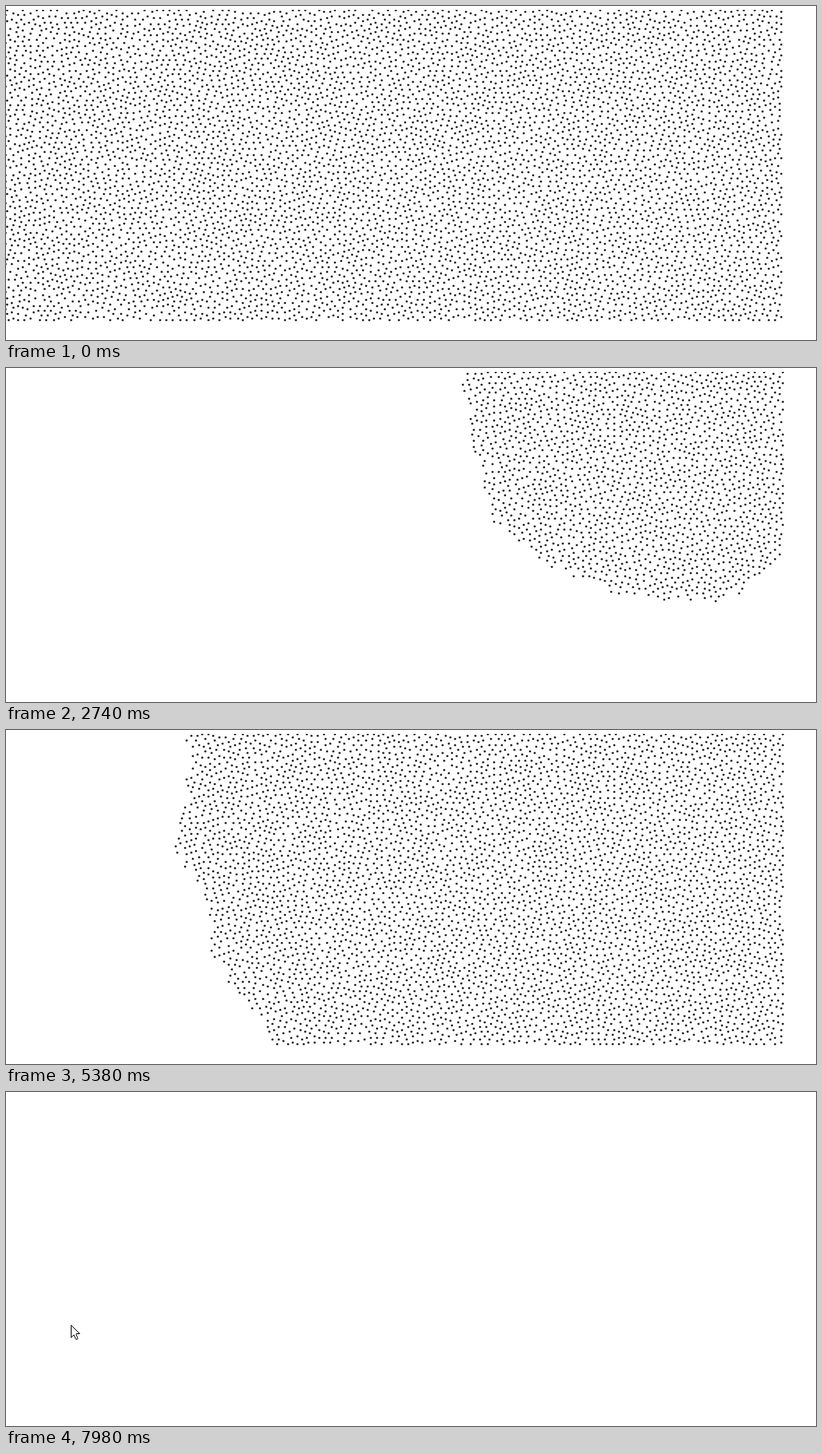
An HTML page with a canvas that plays this animation: 1038x429 px, repeating every 8000 ms.

```html
<!DOCTYPE html>
<html>
<head>
<meta charset="utf-8">
<style>
  html, body { margin: 0; width: 100%; height: 100%; overflow: hidden; background: #fff; }
  canvas { display: block; }
</style>
</head>
<body>
<canvas id="stage" width="1038" height="429"></canvas>
<script>
const ctx = document.getElementById('stage').getContext('2d');
const LOOP = 8000, COLS = 498, ROWS = 200;
const CLEAR_FIRST = 1370, CLEAR_LAST = 7930;

function seededRandom(seed) {
  return () => {
    seed = (seed + 0x6D2B79F5) | 0;
    let v = Math.imul(seed ^ (seed >>> 15), 1 | seed);
    v = (v + Math.imul(v ^ (v >>> 7), 61 | v)) ^ v;
    return ((v ^ (v >>> 14)) >>> 0) / 4294967296;
  };
}

// Poisson-disc samples on an integer grid, in the order they spread from the start cell.
function poissonDisc(startX, startY, seed) {
  const random = seededRandom(seed), minDist = Math.sqrt(10);
  const blocked = new Uint8Array(COLS * ROWS), points = [];
  const add = (x, y) => {
    points.push([x, y]);
    for (let dy = -3; dy <= 3; dy++)
      for (let dx = -3; dx <= 3; dx++) {
        const cx = x + dx, cy = y + dy;
        if (dx * dx + dy * dy < 10 && cx >= 0 && cx < COLS && cy >= 0 && cy < ROWS)
          blocked[cy * COLS + cx] = 1;
      }
  };
  add(startX, startY);
  for (let head = 0; head < points.length; head++) {
    const [px, py] = points[head];
    for (let i = 0; i < 30; i++) {
      const angle = random() * 2 * Math.PI, dist = minDist * (1 + random());
      const x = Math.round(px + Math.cos(angle) * dist);
      const y = Math.round(py + Math.sin(angle) * dist);
      if (x >= 0 && x < COLS && y >= 0 && y < ROWS && !blocked[y * COLS + x]) add(x, y);
    }
  }
  return points;
}

const firstField = poissonDisc(250, 100, 11);
const secondField = poissonDisc(418, 25, 7);

// Time, share of the field that is filled
const growth = [[1400, 0], [1450, .003], [1620, .03], [2740, .258], [3910, .489],
                [5380, .739], [6320, .931], [6900, 1]];
// Time, x, y of the pointer tip
const visits = [
  [[60, 929, 407], [140, 792, 175], [580, 792, 175], [1350, 838, 55],
   [1720, 838, 55], [2200, 438, 429]],
  [[7550, 300, 429], [7920, 83, 299], [8000, 83, 299]]
];

function sample(keys, t) {
  if (t <= keys[0][0]) return keys[0].slice(1);
  const i = keys.findIndex(k => k[0] > t);
  if (i < 0) return keys[keys.length - 1].slice(1);
  const a = keys[i - 1], b = keys[i], p = (t - a[0]) / (b[0] - a[0]);
  return a.slice(1).map((v, j) => v + (b[j + 1] - v) * p);
}

const dot = document.createElement('canvas');
dot.width = dot.height = 3;
const dotCtx = dot.getContext('2d');
dotCtx.arc(1.5, 1.5, 1.3, 0, 2 * Math.PI);
dotCtx.fill();

function drawField(points, count, offsetX) {
  ctx.save();
  ctx.beginPath();
  ctx.rect(0, 5, 997, 400);
  ctx.clip();
  for (let i = 0; i < count; i++)
    ctx.drawImage(dot, points[i][0] * 2 + offsetX - 1, points[i][1] * 2 + 4);
  ctx.restore();
}

const arrow = new Path2D('M.5 .5V16.5L4 13L6.5 18.5H8.5L9 17.5L7 12.5V11.5H11.5Z');

function drawPointer([x, y]) {
  ctx.save();
  ctx.translate(Math.round(x), Math.round(y));
  ctx.fillStyle = '#fff';
  ctx.fill(arrow);
  ctx.stroke(arrow);
  ctx.restore();
}

function draw(now) {
  const t = now % LOOP;
  ctx.clearRect(0, 0, 1038, 429);
  if (t < CLEAR_FIRST) drawField(firstField, firstField.length, -1);
  else if (t < CLEAR_LAST)
    drawField(secondField, Math.floor(sample(growth, t)[0] * secondField.length), 1);
  const visit = visits.find(v => t >= v[0][0] && t < v[v.length - 1][0]);
  if (visit) drawPointer(sample(visit, t));
}

const start = performance.now();
function frame() {
  draw(performance.now() - start);
  requestAnimationFrame(frame);
}
frame();
</script>
</body>
</html>
```
